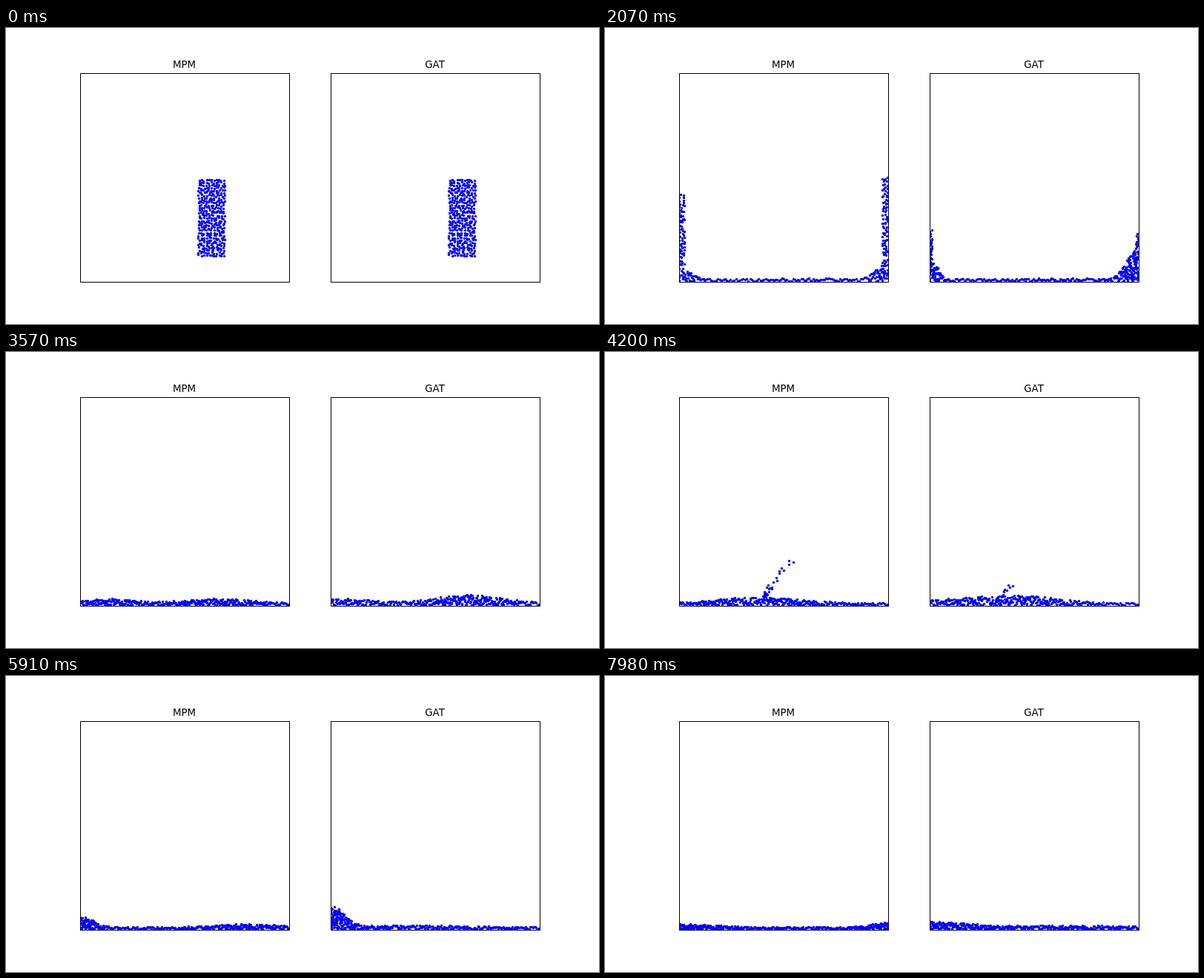
These frames come from a looping animation (800 by 400 pixels, 8 s). An HTML page with a canvas:

```html
<!DOCTYPE html>
<html lang="en">
<head>
<meta charset="utf-8">
<title>Water drop: MPM and GAT</title>
<style>
  html, body { margin: 0; width: 100%; height: 100%; overflow: hidden; background: #fff; }
  canvas { display: block; }
</style>
</head>
<body>
<canvas id="stage" width="800" height="400"></canvas>
<script>
const ctx = document.getElementById('stage').getContext('2d');
const LOOP = 8000, STEP = 30;
const SIZE = 282, TOP = 61, FLOOR = 342.6;
const HALF_G = 1e-4;               // half of gravity, px per ms squared
const LAND = 583, SPREAD = 810;    // block touches the floor, block has become a pool
const COLUMNS = 11, ROWS = 31;
const CELL = 2, DEPTH = 3.2;

const clamp = (v, lo = 0, hi = 1) => Math.min(hi, Math.max(lo, v));
const mix = (a, b, k) => a + (b - a) * k;
const ease = p => (1 - Math.cos(Math.PI * clamp(p))) / 2;

let seed = 7;
const random = () => (seed = seed * 16807 % 2147483647) / 2147483647;

// bx, by: place in the block. u: order from left to right. v: floor to surface.
const particles = Array.from({ length: COLUMNS * ROWS }, (_, i) => {
  const column = i % COLUMNS, row = Math.floor(i / COLUMNS);
  return {
    bx: 159 + 37 * (column + 0.5 + 0.7 * (random() - 0.5)) / COLUMNS,
    by: 105 * (row + 0.5 + 0.7 * (random() - 0.5)) / ROWS,
    u: (column + random()) / COLUMNS,
    v: (row + random()) / ROWS,
    scatter: random() - 0.5
  };
}).sort((a, b) => a.u - b.u);
particles.forEach((q, i) => { q.u = (i + 0.5) / particles.length; });

// Jets climb the side walls; waves then cross the box from wall to wall.
const panels = [
  {
    title: 'MPM', left: 100, frontSpeed: 0.25, jetWidth: 8,
    leftJet: { peak: 127, time: 2373 },
    rightJet: { peak: 143, time: 2160 },
    leftWave: { from: 0, to: SIZE, start: 2370, end: 7370, volume: 300 },
    rightWave: { from: SIZE, to: 0, start: 1850, end: 6200, volume: 420 },
    spray: { x: 112, speed: 0.2 }
  },
  {
    title: 'GAT', left: 438, frontSpeed: 0.18, jetWidth: 5,
    leftJet: { peak: 70, time: 2050 },
    rightJet: { peak: 72, time: 1800 },
    leftWave: { from: 0, to: SIZE, start: 2050, end: 12000, volume: 400 },
    rightWave: { from: SIZE, to: 0, start: 1850, end: 6200, volume: 800 },
    spray: { x: 88, speed: 0.11 }
  }
];

const jetHeight = (jet, t) => jet.peak - HALF_G * (t - jet.time) ** 2;

// A wave stands tall and narrow at a wall and flattens away from it.
function waveAt({ from, to, start, end, volume }, t) {
  const centre = mix(from, to, ease((t - start) / (end - start)));
  const width = 13 + 0.03 * Math.min(Math.abs(t - start), Math.abs(t - end));
  const amount = volume * clamp((t - 1000) / 1000) * Math.exp(-Math.max(0, t - start) / 12000);
  return x => amount / width * Math.exp(-(((x - centre) / width) ** 2));
}

// The collapsing block: a heap that sinks and widens.
function heapAt(t) {
  const age = t - SPREAD;
  const height = 64 * Math.exp(-age / 290), width = 24 + 0.035 * age;
  return x => height / (1 + ((x - 181) / width) ** 2);
}

// Water level and particle density as functions of x.
function surface(panel, t) {
  const heap = heapAt(t);
  const waves = [waveAt(panel.leftWave, t), waveAt(panel.rightWave, t)];
  const leftJet = jetHeight(panel.leftJet, t), rightJet = jetHeight(panel.rightJet, t);
  const lo = 91 - panel.frontSpeed * (t - SPREAD);
  const hi = 274 + 0.35 * (t - SPREAD);
  return x => {
    if (x < lo || x > hi) return { height: 0, amount: 0 };
    const pool = DEPTH + heap(x) + waves[0](x) + waves[1](x);
    const jet = x < panel.jetWidth ? leftJet : x > SIZE - panel.jetWidth ? rightJet : 0;
    const height = Math.max(pool, jet);
    return { height, amount: mix(pool, height, 0.65) };
  };
}

// Thrown up where the two waves meet.
function addSpray(p, { u, v, scatter }, i, t, { x, speed }) {
  if (u < 0.28 || u > 0.52 || i % 3) return p;
  const power = 0.35 + 0.65 * v * v;
  const age = t - 3830, flight = speed * power / HALF_G;
  if (age <= 0 || age >= flight) return p;
  const k = Math.min(1, age / 200, (flight - age) / 200);
  const sx = x + 0.55 * speed * power * power * age + 9 * scatter;
  const sy = speed * power * age - HALF_G * age * age;
  return { x: mix(p.x, Math.min(SIZE - 1, sx), k), y: mix(p.y, sy, k) };
}

// Fill the area below the surface evenly, as the block melts into the pool.
function positions(panel, t) {
  const level = surface(panel, Math.max(t, SPREAD));
  const cells = Array.from({ length: SIZE / CELL }, (_, i) => level((i + 0.5) * CELL));
  const total = cells.reduce((sum, c) => sum + c.amount, 0);
  const melt = clamp((t - LAND) / (SPREAD - LAND));
  const lift = Math.max(0, 33 - HALF_G * t * t);
  let cell = 0, before = 0;
  return particles.map((q, i) => {
    const goal = q.u * total;
    while (cell < cells.length - 1 && before + cells[cell].amount < goal) {
      before += cells[cell++].amount;
    }
    const { height, amount } = cells[cell];
    const pool = { x: (cell + (goal - before) / amount) * CELL, y: q.v * height };
    if (melt === 1) return addSpray(pool, q, i, t, panel.spray);
    return { x: mix(q.bx, pool.x, melt), y: mix(lift + q.by, pool.y, melt) };
  });
}

function drawPanel(panel, t) {
  ctx.save();
  ctx.beginPath();
  ctx.rect(panel.left, TOP, SIZE + 0.5, SIZE + 0.5);
  ctx.clip();
  ctx.fillStyle = '#00f';
  for (const { x, y } of positions(panel, t)) {
    ctx.beginPath();
    ctx.arc(Math.floor(panel.left + x) + 0.5, Math.floor(FLOOR - y) + 0.5, 1.67, 0, 2 * Math.PI);
    ctx.fill();
  }
  ctx.restore();

  ctx.strokeStyle = ctx.fillStyle = '#000';
  ctx.lineWidth = 1;
  ctx.strokeRect(panel.left + 0.5, TOP + 0.5, SIZE, SIZE);
  ctx.font = '13.33px "DejaVu Sans", sans-serif';
  ctx.textAlign = 'center';
  ctx.fillText(panel.title, panel.left + 140.5, 54);
}

function draw() {
  const t = Math.floor((performance.now() % LOOP) / STEP) * STEP;
  ctx.fillStyle = '#fff';
  ctx.fillRect(0, 0, 800, 400);
  panels.forEach(panel => drawPanel(panel, t));
  requestAnimationFrame(draw);
}
draw();
</script>
</body>
</html>
```
